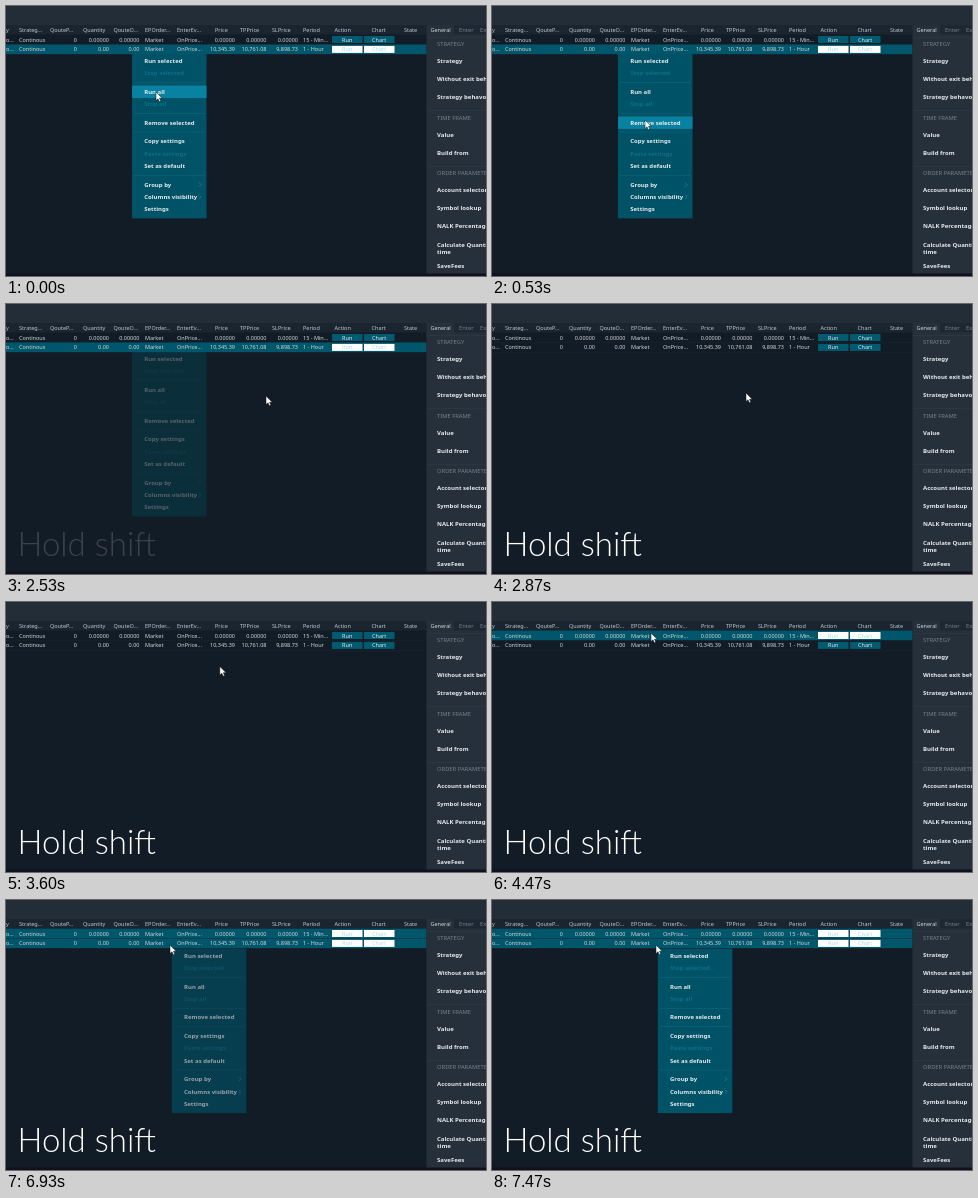
These frames come from a looping animation (480x270 px, 8 s). An HTML page:

```html
<!DOCTYPE html>
<html lang="en">
<head>
<meta charset="utf-8">
<title>Strategy table</title>
<style>
html, body { margin: 0; width: 100%; height: 100%; overflow: hidden; background: #121c26; }
svg { display: block; width: 100vw; height: 100vh; }
text { font: 5.5px "Noto Sans", "Open Sans", sans-serif; fill: #d3dade; white-space: pre; }
.bold { font-size: 6px; font-weight: 600; fill: #e6ecef; }
.off { fill: #0b7088; }
.dim { font-size: 5.8px; fill: #77828b; }
.head { fill: #c3cbd0; }
.title { font: 300 33px Lato, "Open Sans", sans-serif; fill: #fff; }
</style>
</head>
<body>
<svg id="stage" viewBox="0 0 480 270"></svg>
<script>
(() => {
const LOOP = 8000, STEP = 1000 / 15;
const stage = document.getElementById('stage');

function add(parent, tag, attrs, content) {
  const el = document.createElementNS('http://www.w3.org/2000/svg', tag);
  for (const key in attrs) el.setAttribute(key, attrs[key]);
  if (content !== undefined) el.textContent = content;
  parent.appendChild(el);
  return el;
}
const rect = (parent, x, y, width, height, fill) => add(parent, 'rect', {x, y, width, height, fill});
const label = (parent, x, y, str, cls = '', anchor = 'start') =>
  add(parent, 'text', {x, y, class: cls, 'text-anchor': anchor}, str);

// Table
rect(stage, 0, 0, 480, 270, '#121c26');
rect(stage, 0, 0, 480, 19, '#232d37');
rect(stage, 0, 19, 421, 9.5, '#1a2530');

const columns = [
  [0, 'start', 'y', 'o...', 'o...'],
  [13, 'start', 'Strateg...', 'Continous', 'Continous'],
  [71, 'end', 'QouteP...', '0', '0', 44],
  [103, 'end', 'Quantity', '0.00000', '0.00', 77],
  [133.5, 'end', 'QouteO...', '0.00000', '0.00', 107.5],
  [139, 'start', 'EPOrder...', 'Market', 'Market'],
  [171, 'start', 'EnterEv...', 'OnPrice...', 'OnPrice...'],
  [229, 'end', 'Price', '0.00000', '10,345.39', 209],
  [260.5, 'end', 'TPPrice', '0.00000', '10,761.08', 234],
  [292, 'end', 'SLPrice', '0.00000', '9,898.73', 266],
  [297, 'start', 'Period', '15 - Min...', '1 - Hour'],
  [341.5, 'middle', 'Action', '', '', 328.5],
  [373, 'middle', 'Chart', '', '', 365.5],
  [398, 'start', 'State', '', '']
];

for (const [x, , name, , , headX] of columns) label(stage, headX ?? x, 25.6, name, 'head');

const rows = [0, 1].map(i => {
  const y = 28.6 + i * 9.9;
  const back = rect(stage, 0, y, 420.5, 9.6, '#00566b');
  rect(stage, 0, y + 9.6, 420.5, 0.3, '#1d2a34');
  for (const [x, anchor, , ...cells] of columns) label(stage, x, y + 6.9, cells[i], '', anchor);
  const buttons = [['Run', 326], ['Chart', 358]].map(([name, x]) => [
    rect(stage, x, y + 1.4, 30.5, 7, '#005a70'),
    label(stage, x + 15.2, y + 6.9, name, '', 'middle')
  ]);
  return on => {
    back.style.opacity = on ? 1 : 0;
    for (const [box, text] of buttons) {
      box.style.fill = on ? '#fff' : '#005a70';
      text.style.fill = on ? '#a9dcec' : '#e6ecef';
    }
  };
});

// Settings panel
rect(stage, 420.5, 19, 60, 251, '#26303a');
rect(stage, 448, 19, 32, 9.5, '#1d2832');
label(stage, 424.5, 25.6, 'General');
label(stage, 453, 25.6, 'Enter', 'dim');
label(stage, 474, 25.6, 'Exit', 'dim');
for (const y of [31, 104.5, 160]) rect(stage, 421, y, 59, 0.5, '#313c46');
for (const [y, name] of [[37.5, 'STRATEGY'], [111.5, 'TIME FRAME'], [167, 'ORDER PARAMETERS']])
  label(stage, 431, y + 2.1, name, 'dim');
for (const [y, name] of [
  [54.5, 'Strategy'], [73, 'Without exit behavior'], [91, 'Strategy behavoir'],
  [128.5, 'Value'], [146.7, 'Build from'], [183.5, 'Account selector'],
  [202, 'Symbol lookup'], [220.3, 'NALK Percentage'], [238.6, 'Calculate Quantity'],
  [246, 'time'], [260, 'SaveFees']
]) label(stage, 431, y + 2.1, name, 'bold');
rect(stage, 0, 267.5, 480, 2.5, '#11101f');

// Context menu, '-' is a separator and '!' marks a disabled entry
const menu = add(stage, 'g');
rect(menu, 0, 0, 74.5, 164.5, '#005267');
const hover = rect(menu, 0, 0, 74.5, 12.4, '#0882a0');
const entries = [];
let itemY = 0.8;
for (const item of ['Run selected', '!Stop selected', '-', 'Run all', '!Stop all', '-', 'Remove selected', '-',
  'Copy settings', '!Paste settings', 'Set as default', '-', 'Group by', 'Columns visibility', 'Settings']) {
  if (item === '-') {
    rect(menu, 2, itemY + 2.9, 70.5, 0.5, '#17697c');
    itemY += 6.1;
    continue;
  }
  const off = item[0] === '!';
  label(menu, 12.2, itemY + 8.3, off ? item.slice(1) : item, off ? 'bold off' : 'bold');
  if (/Group|Columns/.test(item))
    add(menu, 'path', {d: `M67 ${itemY + 4.2}l2 2-2 2`, fill: 'none', stroke: '#278ba0', 'stroke-width': 0.7});
  if (!off) entries.push(itemY);
  itemY += 12.4;
}

const title = label(stage, 11.5, 252, 'Hold shift', 'title');
const cursor = add(stage, 'path', {
  d: 'M0 0V8.6L2 6.8 3.3 9.8 4.8 9.1 3.5 6.3H6.2Z',
  fill: '#fff', stroke: '#0a1218', 'stroke-width': 0.5
});

// Pointer stops: step, x, y
const path = [
  [0, 150, 86], [4, 148, 114], [7, 148, 114], [8, 153, 114], [27, 153, 114], [33, 260, 92],
  [38, 260, 92], [43, 254, 89], [49, 254, 89], [60, 161, 32], [64, 160, 31], [67, 159, 31],
  [76, 159, 31], [79, 164, 45], [121, 164, 45]
];
const clamp = v => Math.max(0, Math.min(1, v));

function pointer(k) {
  const i = path.findIndex(p => p[0] > k);
  const [k0, x0, y0] = path[i - 1], [k1, x1, y1] = path[i];
  const u = (k - k0) / (k1 - k0), e = u * u * (3 - 2 * u);
  return [x0 + (x1 - x0) * e, y0 + (y1 - y0) * e];
}

function draw(time) {
  const k = Math.floor((time % LOOP + 5) / STEP);
  const [x, y] = pointer(k);
  cursor.setAttribute('transform', `translate(${x} ${y})`);

  rows[0](k >= 61);
  rows[1](k < 40 || k >= 85);

  const second = k >= 60;
  const mx = second ? 165.8 : 126, my = second ? 48.6 : 47.9;
  menu.setAttribute('transform', `translate(${mx} ${my})`);
  menu.style.opacity = second ? clamp((k - 102.2) / 2.8) : clamp((39 - k) / 3);
  const over = x >= mx && x < mx + 74.5 ? entries.find(t => y - my >= t && y - my < t + 12.4) : undefined;
  hover.style.opacity = over === undefined || second ? 0 : 1;
  if (over !== undefined) hover.setAttribute('y', over);

  title.style.opacity = clamp((k - 37) / 6);
}

let start;
function tick(now) {
  start ??= now;
  draw(Math.max(0, now - start));
  requestAnimationFrame(tick);
}
draw(0);
requestAnimationFrame(tick);
})();
</script>
</body>
</html>
```
